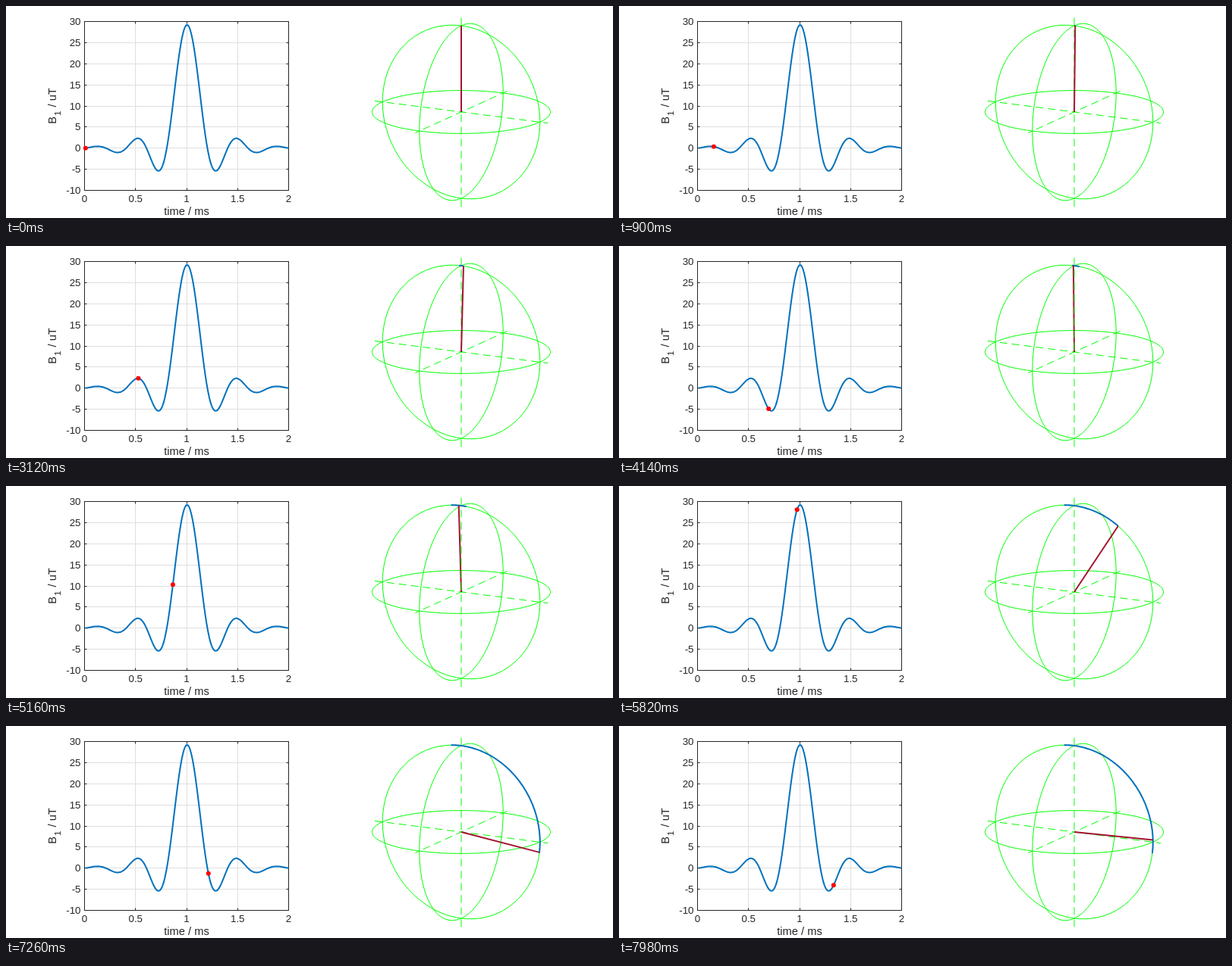
An HTML page that plays this animation: 800x280 px, repeating every 8 s.

```html
<!DOCTYPE html>
<html lang="en">
<head>
<meta charset="utf-8">
<title>Pulse and magnetisation</title>
<style>
  html, body { margin: 0; width: 100%; height: 100%; overflow: hidden; background: #fff; }
  svg { display: block; width: 800px; height: 280px; }
  text { font: 13.33px "Liberation Sans", Arial, sans-serif; fill: #262626; }
  text.label { font-size: 14.67px; }
  path { fill: none; }
  .grid { stroke: #dfdfdf; }
  .axis { stroke: #262626; }
  .sphere { stroke: #0f0; }
  .dash { stroke-dasharray: 10 6; }
  .blue { stroke: #0072bd; stroke-width: 2; stroke-linejoin: round; }
  .vector { stroke: #a2142f; stroke-width: 2; }
</style>
</head>
<body>
<svg id="stage" viewBox="0 0 800 280"></svg>
<script>
const stage = document.getElementById('stage');

function add(tag, attrs, text) {
  const node = document.createElementNS('http://www.w3.org/2000/svg', tag);
  for (const key in attrs) node.setAttribute(key, attrs[key]);
  if (text !== undefined) node.textContent = text;
  return stage.appendChild(node);
}
const toPath = points => 'M' + points.map(p => p.map(v => v.toFixed(2)).join(' ')).join('L');

// Plot box and its scales: 0 to 2 ms, -10 to 30 uT
const LEFT = 103.5, RIGHT = 372.5, TOP = 20.5, BOTTOM = 243.5;
const plotX = ms => LEFT + ms / 2 * (RIGHT - LEFT);
const plotY = field => BOTTOM - (field + 10) / 40 * (BOTTOM - TOP);

// Pulse: sinc with a Gaussian window, sampled at 201 points
const SAMPLES = 201, CENTRE = 100, LOBE = 20, PEAK = 29.2;
function pulse(i) {
  const x = (i - CENTRE) / LOBE, u = (i - CENTRE) / CENTRE;
  const sinc = x === 0 ? 1 : Math.sin(Math.PI * x) / (Math.PI * x);
  return PEAK * sinc * Math.exp(-2 * u * u);
}
const plotPoint = i => [plotX(2 * (i + 1) / SAMPLES), plotY(pulse(i))];

// The flip angle is the running pulse area, 90 degrees in total
const angles = [];
let area = 0;
for (let i = 0; i < SAMPLES; i++) angles.push(area += pulse(i));
for (let i = 0; i < SAMPLES; i++) angles[i] *= Math.PI / 2 / area;

function drawPlot() {
  const xs = [0, 0.5, 1, 1.5, 2].map(v => [v, Math.round(plotX(v) - 0.5) + 0.5]);
  const ys = [-10, -5, 0, 5, 10, 15, 20, 25, 30].map(v => [v, Math.floor(plotY(v)) + 0.5]);
  const inner = list => list.slice(1, -1);

  for (const [, x] of inner(xs)) add('path', { class: 'grid', d: `M${x} ${TOP}V${BOTTOM}` });
  for (const [, y] of inner(ys)) add('path', { class: 'grid', d: `M${LEFT} ${y}H${RIGHT}` });
  add('path', { class: 'axis', d: `M${LEFT} ${TOP}H${RIGHT}V${BOTTOM}H${LEFT}Z` });
  for (const [v, x] of xs) {
    add('path', { class: 'axis', d: `M${x} ${TOP}v3M${x} ${BOTTOM}v-3` });
    add('text', { x: plotX(v), y: 259, 'text-anchor': 'middle' }, v);
  }
  for (const [v, y] of ys) {
    add('path', { class: 'axis', d: `M${LEFT} ${y}h3M${RIGHT} ${y}h-3` });
    add('text', { x: 98.5, y: plotY(v) + 4.5, 'text-anchor': 'end' }, v);
  }
  add('text', { class: 'label', x: 238, y: 276, 'text-anchor': 'middle' }, 'time / ms');
  const label = add('text', {
    class: 'label', 'text-anchor': 'middle', transform: 'translate(65.5 132) rotate(-90)'
  });
  label.innerHTML = 'B<tspan dx="1" dy="6" font-size="11.7">1</tspan><tspan dx="1" dy="-6"> / uT</tspan>';

  const curve = Array.from({ length: SAMPLES }, (_, i) => plotPoint(i));
  add('path', { class: 'blue', d: toPath(curve) });
}

// Orthographic view of the unit sphere: x to the front left, y to the front right, z up
const RADIUS = 117.5, AZIMUTH = 28 * Math.PI / 180, ELEVATION = 14 * Math.PI / 180;
function project(x, y, z) {
  const c = Math.cos(AZIMUTH), s = Math.sin(AZIMUTH);
  const nearness = x * c + y * s;
  return [
    600 + RADIUS * (y * c - x * s),
    140 + RADIUS * (nearness * Math.sin(ELEVATION) - z * Math.cos(ELEVATION))
  ];
}
const tip = angle => project(0, Math.sin(angle), Math.cos(angle));

const drawAxis = (...end) => add('path', {
  class: 'sphere dash',
  d: toPath([project(...end.map(v => -v)), project(...end)])
});

function drawSphere() {
  const circles = [(c, s) => [c, s, 0], (c, s) => [c, 0, s], (c, s) => [0, c, s]];
  for (const circle of circles) {
    const points = Array.from({ length: 101 }, (_, i) => {
      const a = i * Math.PI / 50;
      return project(...circle(Math.cos(a), Math.sin(a)));
    });
    add('path', { class: 'sphere', d: toPath(points) });
  }
  drawAxis(1.1, 0, 0);
  drawAxis(0, 1.1, 0);
}

drawPlot();
drawSphere();
const dot = add('circle', { r: 3, fill: '#f00' });
const backAxis = drawAxis(0, 0, 1.1);
const trail = add('path', { class: 'blue' });
const vector = add('path', { class: 'vector' });
const frontAxis = drawAxis(0, 0, 1.1);

const LOOP = 8000, STEP = 60;
const start = performance.now();
let shown = -1;

function draw(now) {
  const step = Math.floor(Math.max(0, now - start) % LOOP / STEP);
  if (step !== shown) {
    shown = step;
    const [x, y] = plotPoint(step);
    dot.setAttribute('cx', x);
    dot.setAttribute('cy', y);
    trail.setAttribute('d', toPath(angles.slice(0, step + 1).map(tip)));
    vector.setAttribute('d', toPath([project(0, 0, 0), tip(angles[step])]));
    // The vertical axis is nearer than the vector when it leans back
    const leansBack = angles[step] < -1e-4;
    frontAxis.style.display = leansBack ? '' : 'none';
    backAxis.style.display = leansBack ? 'none' : '';
  }
  requestAnimationFrame(draw);
}
draw(start);
</script>
</body>
</html>
```
